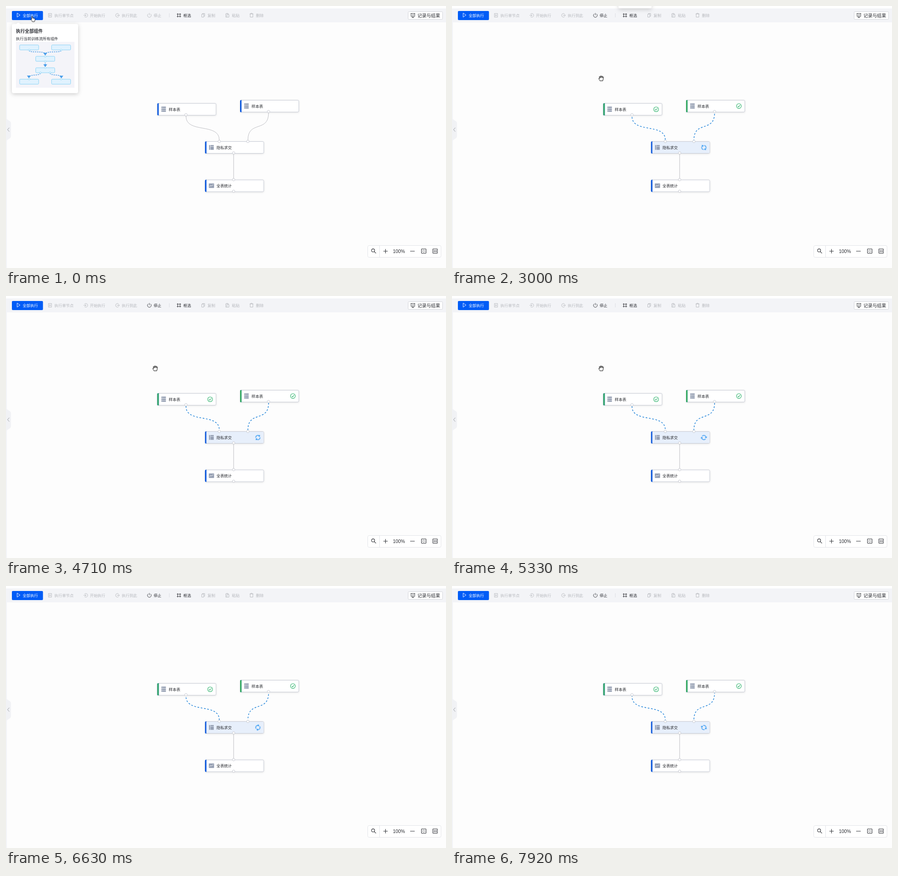
An HTML page that plays this animation: 970x577 px, repeating every 7.96 s.

```html
<!DOCTYPE html>
<html lang="zh-CN">
<head>
<meta charset="utf-8">
<title>训练流执行</title>
<style>
html, body { margin: 0; width: 100%; height: 100%; overflow: hidden; background: #fdfdfd; }
svg { display: block; }
text { font: 8.45px "Noto Sans CJK SC", "Noto Sans CJK", sans-serif; fill: currentColor; }
.line { fill: none; stroke: currentColor; stroke-width: .9; }
.off { color: #b6b8bd; }
.dark { color: #2b2d33; }
.label { color: #25272c; font-weight: 500; }
.label text { font-weight: 500; }
.card { fill: #fff; stroke: #c0c4d0; stroke-width: .9; filter: drop-shadow(0 1.5px 2px rgba(0,0,0,.1)); }
.edge { fill: none; stroke: #b9babf; stroke-width: .95; }
.port { fill: #fff; stroke: #b9bcc6; stroke-width: .8; }
.bar { fill: #0b57dc; }
.done .bar { fill: #35aa60; }
.tick { fill: none; stroke: #27b067; stroke-width: 1.1; }
.mini { fill: #e0f2fe; stroke: #7fd0f5; stroke-width: .9; }
.hand { fill: #fff; stroke: #111; stroke-width: 1; stroke-linejoin: round; }

/* every timeline shares one loop length */
.idle, .run, .stop, .tip, .toast, .cursor, .cursor > *, .dash, .spin {
  animation: 7.96s linear infinite;
}
.idle { animation-name: hide; animation-timing-function: step-end; }
.run { animation-name: show; animation-timing-function: step-end; }
.stop { animation-name: enable; animation-timing-function: step-end; }
.tip { animation-name: tip; transform-origin: 27px 38px; }
.toast { animation-name: toast; filter: drop-shadow(0 3px 5px rgba(0,0,0,.17)); }
.dash { animation-name: march; fill: none; stroke: #1b80d8; stroke-width: 1.45; stroke-dasharray: 3.61; }
.spin { animation-name: spin; }
.cursor { animation-name: travel; }
.cursor > * { animation-timing-function: step-end; }
.cursor .point { animation-name: point; }
.cursor .grab { animation-name: grab; }
.cursor .move { animation-name: move; }

@keyframes hide { 0% { opacity: 1 } 33.9%, to { opacity: 0 } }
@keyframes show { 0% { opacity: 0 } 33.9%, to { opacity: 1 } }
@keyframes enable { 0% { color: #b6b8bd } 33.9%, to { color: #2b2d33 } }
@keyframes tip {
  0%, 33.2% { opacity: 1; transform: none }
  34.6%, to { opacity: 0; transform: scale(.8) }
}
@keyframes toast {
  0%, 16.6% { transform: translateY(-50px); animation-timing-function: ease-out }
  20.3%, 55% { transform: none; animation-timing-function: ease-in }
  58.4%, to { transform: translateY(-50px) }
}
@keyframes march { from { stroke-dashoffset: -4.4 } to { stroke-dashoffset: -196 } }
@keyframes spin { from { transform: rotate(-990deg) } to { transform: rotate(1875.6deg) } }
@keyframes travel {
  0%, 12.5% { transform: translate(57.6px, 22.5px) }
  12.6%, 31.9% { transform: translate(58.6px, 22.7px); animation-timing-function: ease-in-out }
  35.9%, 73.4% { transform: translate(329px, 159px) }
  74.2%, 74.9% { transform: translate(352px, 216px); animation-timing-function: ease-in }
  80.4%, to { transform: translate(895px, 331px) }
}
@keyframes point { 0% { opacity: 1 } 32.9%, to { opacity: 0 } }
@keyframes grab { 0% { opacity: 0 } 32.9% { opacity: 1 } 73.9% { opacity: 0 } 77% { opacity: 1 } 80.4%, to { opacity: 0 } }
@keyframes move { 0% { opacity: 0 } 73.9% { opacity: 1 } 77%, to { opacity: 0 } }
</style>
</head>
<body>
<svg width="970" height="577" viewBox="0 0 970 577">
  <defs>
    <g id="node">
      <rect class="card" x=".5" y=".5" width="129" height="26" rx="2.5"/>
      <path class="bar" d="M3.2 0V27H2.5Q0 27 0 24.5V2.5Q0 0 2.5 0Z"/>
    </g>
    <g id="table" fill="#96a0b3">
      <path d="M-5-5.7H5V-2.5H-5ZM-5-1.6H5V1.6H-5ZM-5 2.5H5V5.7H-5Z"/>
      <path d="M-3.6-4.1h1.3M-3.6 0h1.3M-3.6 4.1h1.3" stroke="#e6e9ee" stroke-width=".8"/>
    </g>
    <g id="tick" class="tick"><circle r="5.3"/><path d="M-2.5 0L-.6 2L2.6-1.9"/></g>
    <circle id="port" class="port" r="2.8"/>
    <rect id="mini" class="mini" x="-21" y="-5.5" width="42" height="11" rx="1.8"/>
    <circle id="dot" r="1.8" fill="#fff" stroke="#7fd0f5" stroke-width=".8"/>
    <path id="arrow" d="M-4.3-2.8H4.3L0 3Z" fill="#459be9"/>
    <path id="arc" d="M-4.7-.7A4.75 4.75 0 0 1 4-2.6M4.9-4.6L4.5-1.8L1.9-2.3"/>
  </defs>

  <rect width="970" height="577" fill="#fdfdfd"/>
  <rect width="970" height="5" fill="#fff"/>
  <path d="M0 5.5H970V36H2V577H0Z" fill="#f3f4f7"/>
  <path d="M0 248L9 254Q11 255.500 11 258V287Q11 289.500 9 291L0 297Z" fill="#f1f2f5"/>
  <path class="line" color="#8e9198" d="M7.300 268L3.300 272.300L7.300 276.600"/>

  <!-- toolbar -->
  <rect x="13" y="11" width="68.500" height="20" rx="2" fill="#005cf6"/>
  <g color="#fff">
    <path class="line" stroke-width="1.1" d="M24.500 15.500L31 20L24.500 24.500Z"/>
    <text x="36.700" y="23.900" style="font-weight:500">全部执行</text>
  </g>
  <g class="off">
    <path class="line" d="M93.500 16.500H100.500V24.500H93.500ZM96 18.700L98.800 20.500L96 22.300Z"/>
    <text x="106.800" y="23.900">执行单节点</text>
    <path class="line" d="M173 18A4 4 0 1 1 173 23M171 20.500H176.500M174.700 18.700L176.500 20.500L174.700 22.300"/>
    <text x="185" y="23.900">开始执行</text>
    <path class="line" d="M248.300 17.600A4 4 0 1 0 248.300 23.400M244.500 20.500H250M248.200 18.700L250 20.500L248.200 22.300"/>
    <text x="255.300" y="23.900">执行到此</text>
  </g>
  <g class="stop">
    <path class="line" d="M313.500 17.300A4.200 4.200 0 1 0 318.500 17.300M316 15.500V20.300"/>
    <text x="325.500" y="23.900">停止</text>
  </g>
  <path d="M360 16V25" stroke="#dcdee2"/>
  <g class="dark">
    <path class="line" d="M378.500 16V25M383.800 16V25M376.500 18H386M376.500 23H386"/>
    <text x="391" y="23.900">框选</text>
  </g>
  <g class="off">
    <path class="line" d="M433 16.500H438V22.500H436.500M431.500 18H436V24.500H431.500ZM433 16.500V18"/>
    <text x="444.300" y="23.900">复制</text>
    <path class="line" d="M487 24.500H484.500V17H490.500V18.500M486 16.300H489M487 19H491.500V24.500H487Z"/>
    <text x="498" y="23.900">粘贴</text>
    <path class="line" d="M537 17.500H545.500M539.500 17.300V16H543V17.300M538.300 17.500V24.500H544.200V17.500"/>
    <text x="551" y="23.900">删除</text>
  </g>
  <rect x="886.500" y="12.500" width="76" height="17" rx="2" fill="#fff" stroke="#d3d5da"/>
  <g class="dark">
    <path class="line" d="M892 16.500H902M893 16.500V23H901V16.500M897 23V25.300M894.500 25.500H899.500M895 20.500L896.600 19L897.700 20.500L899.300 18.700"/>
    <text x="907" y="24.500" style="font-size:10px">记录与结果</text>
  </g>

  <!-- graph -->
  <path class="edge" d="M501.800 324V383"/>
  <g class="idle edge">
    <path d="M396.800 240V242.900C396.800 281.600 470.200 256.400 470.200 295.100V298"/>
    <path d="M578.800 233V235.700C578.800 279.200 533.300 251.600 533.300 295.100V298"/>
  </g>
  <g class="run">
    <path class="dash" d="M396.800 240V242.900C396.800 281.600 470.200 256.400 470.200 295.100V298"/>
    <path class="dash" d="M578.800 233V235.700C578.800 279.200 533.300 251.600 533.300 295.100V298"/>
  </g>

  <g transform="translate(333.500 214)">
    <use href="#node"/>
    <g class="run done"><path class="bar" d="M3.200 0V27H2.500Q0 27 0 24.500V2.500Q0 0 2.500 0Z"/><use href="#tick" x="116.500" y="13.500"/></g>
    <use href="#table" x="14" y="13.300"/>
    <g class="label"><text x="25.300" y="16.500">样本表</text></g>
  </g>
  <g transform="translate(516 207)">
    <use href="#node"/>
    <g class="run done"><path class="bar" d="M3.200 0V27H2.500Q0 27 0 24.500V2.500Q0 0 2.500 0Z"/><use href="#tick" x="116.500" y="13.300"/></g>
    <use href="#table" x="14" y="13.300"/>
    <g class="label"><text x="25.300" y="16.500">样本表</text></g>
  </g>
  <g transform="translate(438.700 298)">
    <use href="#node"/>
    <g class="run">
      <path d="M3.200 1H127Q129 1 129 3V24Q129 26 127 26H3.200Z" fill="#e7effb"/>
      <g transform="translate(116.500 13.700)"><g class="spin line" color="#1e90f2" style="stroke-width:1.15"><use href="#arc"/><use href="#arc" transform="rotate(180)"/></g></g>
    </g>
    <path d="M9 8.300H11.500V18.700H9ZM12.300 8.300H19.300V10.900H12.300ZM12.300 11.700H19.300V18.700H12.300Z" fill="#96a0b3"/>
    <g class="label"><text x="25.300" y="16.500">隐私求交</text></g>
  </g>
  <g transform="translate(438.700 382.500)">
    <use href="#node"/>
    <rect x="8.500" y="8.300" width="11.500" height="10" rx=".8" fill="#96a0b3"/>
    <path d="M10.300 15.300L12.800 12.300L14.800 14L18.200 10.700" fill="none" stroke="#fff"/>
    <g class="label"><text x="25.300" y="16.500">全表统计</text></g>
  </g>
  <use href="#port" x="396.800" y="239.500"/>
  <use href="#port" x="578.800" y="232.500"/>
  <use href="#port" x="470.200" y="298.300"/>
  <use href="#port" x="533.300" y="298.300"/>
  <use href="#port" x="501.800" y="323.600"/>
  <use href="#port" x="501.800" y="382.500"/>
  <use href="#port" x="501.800" y="408"/>

  <!-- zoom bar -->
  <rect x="797.500" y="527.500" width="161.500" height="26" rx="3" fill="#fff" stroke="#e2e4e8"/>
  <path d="M823.500 528V553" stroke="#e2e4e8"/>
  <g class="dark">
    <g class="line" style="stroke-width:1.1">
      <circle cx="809.300" cy="538.300" r="3.400"/>
      <path d="M811.800 540.800L815.700 544.700M832 540H841.500M836.700 535.200V544.800M891 540H901"/>
      <rect x="916" y="535" width="10" height="9.500" rx=".8"/>
      <rect x="941" y="535" width="10" height="9.500" rx=".8"/>
      <path d="M921 537V538.500M921 541.300V542.800M918 539.800H919.700M922.300 539.800H924M944 537.500V542.300M948.200 537.500V542.300M946.100 538.300V539.300M946.100 540.500V541.500"/>
    </g>
    <text x="853" y="543.900" style="font:500 10.400px 'Liberation Sans',Arial,sans-serif">100%</text>
  </g>

  <!-- hint card -->
  <g class="tip">
    <g style="filter:drop-shadow(0 2px 5px rgba(0,0,0,.2))">
      <path d="M22 40L27 36.500L32 40Z" fill="#fff"/>
      <rect x="13" y="39.500" width="146" height="152.500" rx="4" fill="#fff"/>
    </g>
    <g class="dark">
      <text x="22" y="59.300" style="font-size:9.800px;font-weight:700">执行全部组件</text>
      <text x="22" y="74.500">执行当前训练流所有组件</text>
    </g>
    <rect x="22" y="79" width="129" height="101" fill="#f4f4f9"/>
    <path d="M51 98C53 104 82 98 86.500 105M121.500 98C119 104 91 98 86.500 105M86.500 122V130M76 148C74 154 55 150 51 156M97 148C99 154 118 150 122 156" fill="none" stroke="#459be9" stroke-width="1.500" stroke-dasharray="2.600 2"/>
    <use href="#mini" x="51" y="91.300"/>
    <use href="#mini" x="121.500" y="91.300"/>
    <use href="#mini" x="86.500" y="116.300"/>
    <use href="#mini" x="86.500" y="141.500"/>
    <use href="#mini" x="51" y="166.700"/>
    <use href="#mini" x="121.500" y="166.700"/>
    <use href="#dot" x="51" y="97"/>
    <use href="#dot" x="121.500" y="97"/>
    <use href="#dot" x="86.500" y="111"/>
    <use href="#dot" x="86.500" y="122"/>
    <use href="#dot" x="86.500" y="136"/>
    <use href="#dot" x="76" y="147"/>
    <use href="#dot" x="97" y="147"/>
    <use href="#dot" x="51" y="161"/>
    <use href="#dot" x="121.500" y="161"/>
    <use href="#arrow" x="86.500" y="106"/>
    <use href="#arrow" x="86.500" y="131.300"/>
    <use href="#arrow" x="50.500" y="156"/>
    <use href="#arrow" x="122" y="156.300"/>
  </g>

  <rect class="toast" x="367" y="-24" width="73" height="29" rx="3" fill="#fff"/>

  <g class="cursor">
    <path class="point hand" d="M-1.100 7.200V1Q0-.8 1.100 1V4.200Q2.400 3.600 3 4.600Q4.200 4 4.800 5.200Q6.200 4.800 6.400 6.200L6 9.600L5 12H.6Q-.4 9.800-3 7.400Q-3.200 5.800-1.100 7.200Z"/>
    <path class="grab hand" d="M-3 5.800C-3.400 4-5.800 1.600-5.600 .4Q-4.800-.8-3.200 1L-4.400-3.200Q-3.600-4.800-2.600-3.400L-1.800-.8V-4.600Q-.8-6 .1-4.600L.3-1L1.100-4.400Q2.200-5.400 2.800-4L2.400-.6L3.600-2.800Q4.800-3.400 5-2L4 3L3.400 5.800Z"/>
    <g class="move">
      <path d="M0-5.300L2.300-2.700H.8V-.8H2.700V-2.300L5.300 0L2.700 2.300V.8H.8V2.700H2.300L0 5.300L-2.300 2.700H-.8V.8H-2.700V2.300L-5.300 0L-2.700-2.300V-.8H-.8V-2.700H-2.300Z" fill="#111" stroke="#fff" stroke-width="1" paint-order="stroke"/>
    </g>
  </g>
</svg>
</body>
</html>
```
